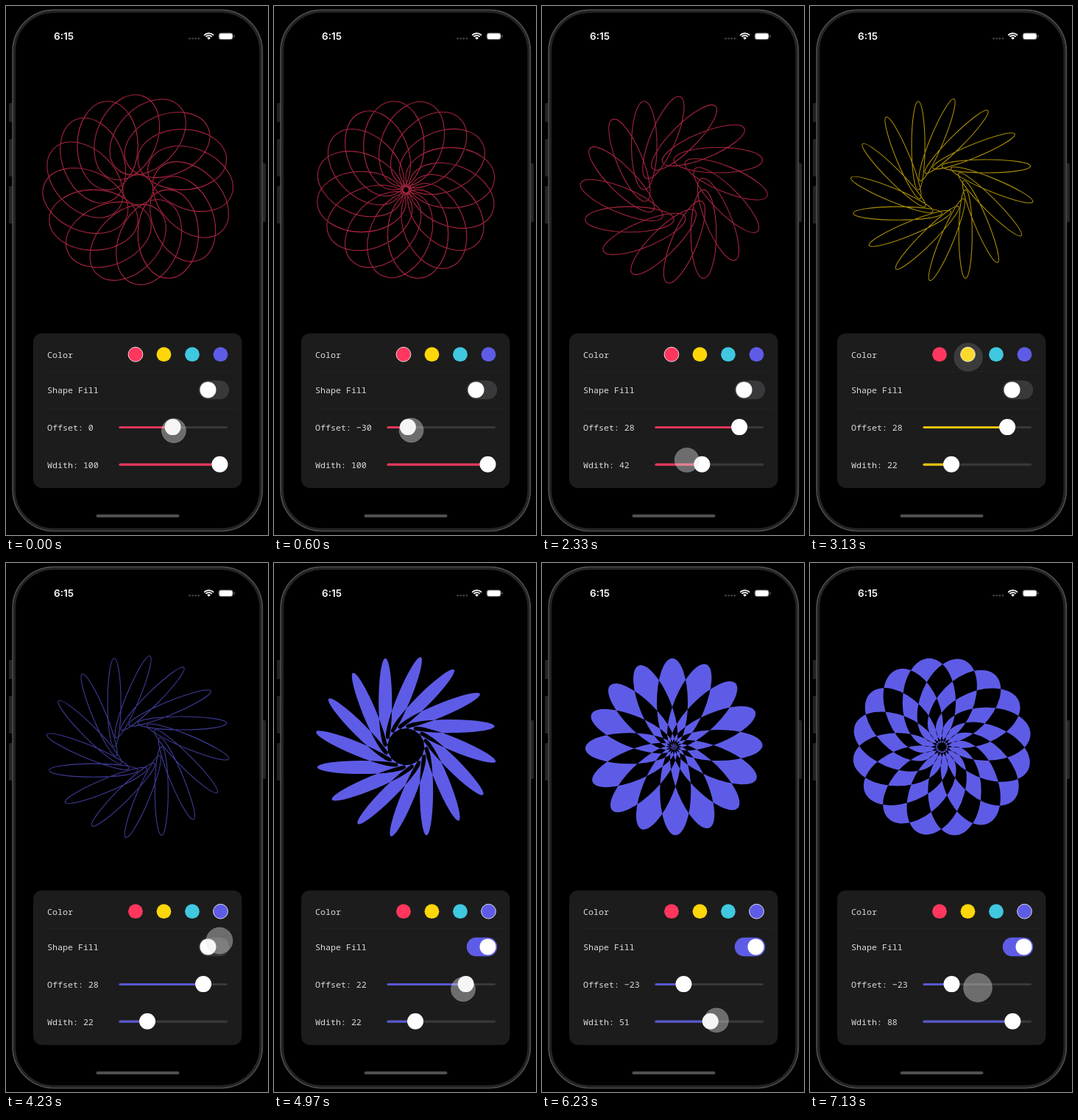
Animation of 356 by 720 pixels, one loop 7160 ms. Source, as an HTML page with a canvas:

```html
<!DOCTYPE html>
<html lang="en">
<head>
<meta charset="utf-8">
<title>Flower controls</title>
<style>
html, body { margin: 0; width: 100%; height: 100%; overflow: hidden; background: #000; }
canvas { display: block; width: 356px; height: 720px; }
</style>
</head>
<body>
<canvas id="stage"></canvas>
<script>
const W = 356, H = 720, LOOP = 7160;
const canvas = document.getElementById('stage');
const dpr = window.devicePixelRatio || 1;
canvas.width = Math.round(W * dpr);
canvas.height = Math.round(H * dpr);
const ctx = canvas.getContext('2d');

const COLORS = ['#ff375f', '#ffd60a', '#40c8e0', '#5e5ce6'];
const COLOR_X = [176, 214.5, 253, 291.5];
const POINT = 0.823;
const PETAL_LENGTH = 120.4;

// Keyframes: [time, ...values], eased between neighbours.
const offsetKeys = [[60, 0], [470, -33.3], [1420, 28], [4850, 28], [5470, -23]];
const widthKeys = [[1930, 100], [2530, 22], [5950, 22], [6560, 88]];
const colorTimes = [2990, 3380, 3740];
const FILL_TIME = 4290;

const touches = [
  { from: -500, to: 1480, keys: [[0, 228, 578], [440, 179, 577], [1350, 270, 582]] },
  { from: 1830, to: 2640, keys: [[1900, 290, 625], [2450, 184, 617]] },
  { from: 2890, to: 3050, keys: [[0, 215, 478]] },
  { from: 3280, to: 3440, keys: [[0, 254, 478]] },
  { from: 3640, to: 3800, keys: [[0, 292, 478]] },
  { from: 4130, to: 4350, keys: [[0, 290, 514]] },
  { from: 4750, to: 5580, keys: [[4830, 269, 580], [5420, 186, 581]] },
  { from: 5860, to: 6640, keys: [[5940, 192, 625], [6500, 277, 620]] },
  { from: 7080, to: 9000, keys: [[0, 228, 578]] }
];

const clamp = v => Math.max(0, Math.min(1, v));
const ease = p => p * p * (3 - 2 * p);

function sample(keys, t) {
  let i = 0;
  while (i < keys.length - 1 && t >= keys[i + 1][0]) i++;
  const a = keys[i], b = keys[i + 1] || a;
  const p = b === a ? 0 : ease(clamp((t - a[0]) / (b[0] - a[0])));
  return a.slice(1).map((v, n) => v + (b[n + 1] - v) * p);
}

function box(x, y, w, h, r, fill, stroke, line = 1) {
  ctx.beginPath();
  ctx.roundRect(x, y, w, h, r);
  paint(fill, stroke, line);
}

function disc(x, y, r, fill, stroke, line = 1) {
  ctx.beginPath();
  ctx.arc(x, y, r, 0, Math.PI * 2);
  paint(fill, stroke, line);
}

function paint(fill, stroke, line) {
  if (fill) { ctx.fillStyle = fill; ctx.fill(); }
  if (stroke) { ctx.strokeStyle = stroke; ctx.lineWidth = line; ctx.stroke(); }
}

function label(text, y) {
  ctx.font = '11.65px "Noto Sans Mono", "DejaVu Sans Mono", monospace';
  ctx.fillStyle = '#dcdcdc';
  ctx.fillText(text, 56, y);
}

function phone() {
  [[132, 26], [181, 51], [245, 51]].forEach(([y, h]) => box(4, y, 5, h, 1.5, '#242424'));
  box(348, 214, 5, 80, 1.5, '#242424');
  box(9.2, 5.5, 339, 709, 56, '#000', '#4a4a4a', 2);
  box(11.6, 7.9, 334.2, 704.2, 53.6, null, '#242424', 2.8);
}

function statusBar() {
  ctx.font = '600 13.5px Inter, sans-serif';
  ctx.fillStyle = '#fff';
  ctx.fillText('6:15', 65, 46);
  for (let i = 0; i < 4; i++) disc(249.5 + i * 4.1, 44.3, 1.3, '#444');

  const cy = 45.8;
  [8.7, 5.7].forEach(r => {
    ctx.beginPath();
    ctx.arc(275.6, cy, r, -Math.PI * 0.76, -Math.PI * 0.24);
    paint(null, '#fff', 1.8);
  });
  ctx.beginPath();
  ctx.moveTo(275.6, cy);
  ctx.arc(275.6, cy, 3.3, -Math.PI * 0.76, -Math.PI * 0.24);
  ctx.closePath();
  paint('#fff');

  box(288.8, 36.5, 19.8, 9.4, 3, '#000', '#4a4a4a', 0.8);
  box(289.6, 37.2, 18.2, 8, 2.4, '#fff');
  box(309.6, 39.6, 1.2, 3.2, 0.6, '#666');
}

function flower(offset, width, color, filled) {
  const rx = width * POINT / 2, ry = PETAL_LENGTH / 2;
  const cx = offset * POINT + rx;
  const path = new Path2D();
  for (let i = 0; i < 16; i++) {
    const a = i * Math.PI / 8, c = Math.cos(a), s = Math.sin(a);
    const x = 179.2 + cx * c - ry * s, y = 250.1 + cx * s + ry * c;
    const petal = new Path2D();
    petal.ellipse(x, y, rx, ry, a, 0, Math.PI * 2);
    path.addPath(petal);
  }
  if (filled) {
    ctx.fillStyle = color;
    ctx.fill(path, 'evenodd');
  } else {
    ctx.globalAlpha = 0.66;
    ctx.strokeStyle = color;
    ctx.lineWidth = 1.1;
    ctx.stroke(path);
    ctx.globalAlpha = 1;
  }
}

function slider(x, y, color) {
  box(153.5, y - 1.6, 147.5, 3.2, 1.6, '#39393b');
  ctx.globalAlpha = 0.88;
  box(153.5, y - 1.6, x - 153.5, 3.2, 1.6, color);
  ctx.globalAlpha = 1;
  disc(x, y - 0.4, 11, '#fff');
}

function panel(offset, width, selected, t) {
  const color = COLORS[selected];
  box(37, 445.5, 283.5, 210.5, 12, '#1c1c1c');
  ctx.fillStyle = '#222';
  [497, 547.5, 598.5].forEach(y => ctx.fillRect(56, y, 259, 0.8));

  const signed = (offset <= -1 ? '\u2212' : '') + Math.abs(Math.trunc(offset));
  label('Color', 478.5);
  label('Shape Fill', 526.5);
  label('Offset: ' + signed, 577.5);
  label('Wdith: ' + Math.trunc(width), 628.5);

  COLORS.forEach((c, i) =>
    disc(COLOR_X[i], 474.2, 9.9, c, i === selected ? 'rgba(255,255,255,0.8)' : null, 1));

  const on = ease(clamp((t - FILL_TIME) / 200));
  box(261.8, 509.8, 41.4, 25.4, 12.7, '#39393b');
  ctx.globalAlpha = on;
  box(261.8, 509.8, 41.4, 25.4, 12.7, color);
  ctx.globalAlpha = 1;
  disc(274.5 + 16 * on, 522.4, 11, '#fff');

  slider(226.6 + offset * 1.483, 573.5, color);
  slider(164.3 + width * 1.262, 624.2, color);
}

function touch({ from, to, keys }, t) {
  if (t < from || t > to + 130) return;
  const enter = clamp((t - from) / 150), leave = clamp((t - to) / 130);
  const [x, y] = sample(keys, t);
  ctx.globalAlpha = Math.min(1, enter * 4) * (1 - leave);
  disc(x, y, 16.5 + 4.5 * (1 - enter) + 4.5 * leave,
    'rgba(230,230,230,0.4)', 'rgba(200,200,200,0.35)', 0.8);
  ctx.globalAlpha = 1;
}

function draw(t) {
  const [offset] = sample(offsetKeys, t);
  const [width] = sample(widthKeys, t);
  const selected = colorTimes.filter(time => t >= time).length;

  ctx.setTransform(dpr, 0, 0, dpr, 0, 0);
  ctx.fillStyle = '#000';
  ctx.fillRect(0, 0, W, H);
  phone();
  statusBar();
  flower(offset, width, COLORS[selected], t >= FILL_TIME);
  panel(offset, width, selected, t);
  box(122.5, 692, 113, 4, 2, '#505050');
  touches.forEach(g => touch(g, t));
}

const start = performance.now();
function frame() {
  draw((performance.now() - start) % LOOP);
  requestAnimationFrame(frame);
}
frame();
</script>
</body>
</html>
```
